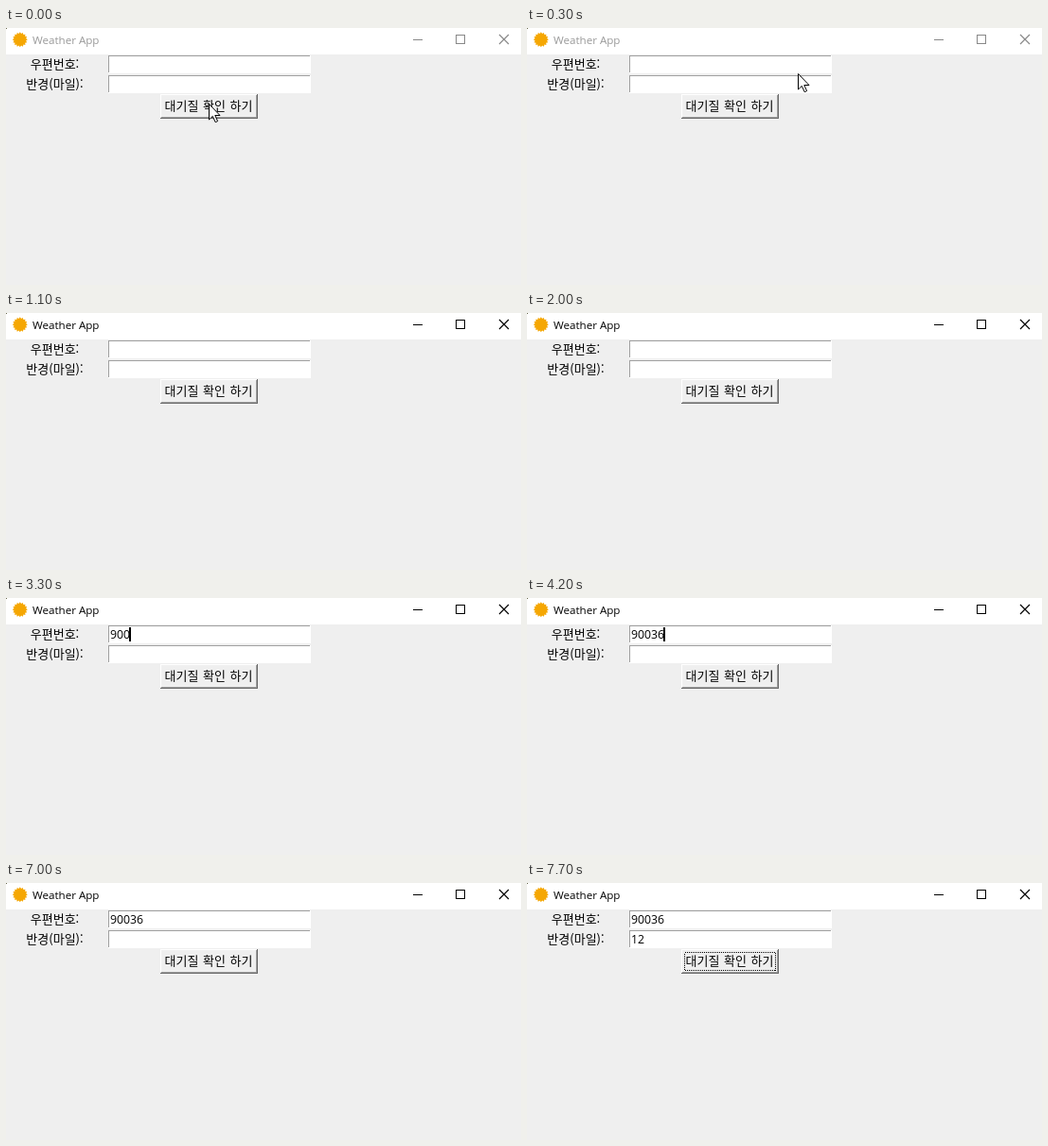
Write an HTML page that moves like this. It is 544 by 272 pixels and loops after 8000 ms.

```html
<!DOCTYPE html>
<html lang="ko">
<head>
<meta charset="utf-8">
<title>Weather App</title>
<style>
  html, body { margin: 0; width: 100%; height: 100%; overflow: hidden; background: #efefef; }
  svg { display: block; width: 544px; height: 272px; }
  text { font-family: "Open Sans", "Noto Sans", sans-serif; font-size: 12.25px; }
  .ko { font-family: "Noto Sans CJK KR", "Noto Sans CJK", "Noto Sans CJK JP", sans-serif; font-size: 13px; font-weight: 350; text-anchor: middle; }
  .title { font-size: 11.6px; }
  .crisp { shape-rendering: crispEdges; }
</style>
</head>
<body>
<svg viewBox="0 0 544 272">
  <rect width="544" height="272" fill="#efefef"/>
  <rect width="544" height="28" fill="#fff"/>
  <rect class="crisp" width="1" height="1" fill="#6b6b50"/>
  <polygon id="sun" fill="#f5a703"/>
  <text id="title" class="title" x="28" y="16.5">Weather App</text>
  <g id="controls" fill="none">
    <path class="crisp" d="M430 12.5h10M475.5 7.5h9v9h-9z"/>
    <path d="M521 7l10 10M531 7l-10 10" stroke-width="1.2"/>
  </g>

  <text class="ko" x="51.5" y="42.5">우편번호:</text>
  <text class="ko" x="51.5" y="63.5">반경(마일):</text>

  <g id="fields" class="crisp"></g>
  <text id="zip" x="110" y="43"></text>
  <text id="radius" x="110" y="64"></text>

  <g class="crisp">
    <rect x="163" y="70" width="103" height="26" fill="#696969"/>
    <rect x="163" y="70" width="102" height="25" fill="#fff"/>
    <rect x="164" y="71" width="101" height="24" fill="#a0a0a0"/>
    <rect x="164" y="71" width="100" height="23" fill="#efefef"/>
    <rect id="focus" x="166.5" y="73.5" width="96" height="19" fill="none" stroke="#000" stroke-dasharray="1 1"/>
  </g>
  <text class="ko" x="214" y="86.5" style="word-spacing:1px">대기질 확인 하기</text>

  <rect id="caret" class="crisp" width="2" height="15"/>
  <path id="pointer" d="M.5.5v16.5l3.8-3.6 2.9 6.3 2.4-1.1-2.8-6.1h5.2z" fill="#fff" stroke="#000"/>
</svg>
<script>
const LOOP = 8000;
const $ = id => document.getElementById(id);

// Each list holds [start time, value]; a value lasts until the next entry.
const zipText = [[0, ''], [2500, '9'], [2900, '90'], [3100, '900'], [3600, '9003'], [3700, '90036']];
const radiusText = [[0, ''], [7600, '12']];
const caretOn = [
  [0, false], [500, true], [1100, false], [1400, true], [2000, false], [2300, true],
  [2900, false], [3300, true], [3900, false], [4200, true], [5100, false], [5400, true],
  [6000, false], [6400, true], [7000, false], [7300, true], [7700, false]
];
const pointerAt = [
  [0, [214, 80]], [100, [232, 70]], [200, [270, 54]], [300, [286, 48]],
  [900, [390, 52]], [1000, [527, 62]], [1100, null]
];

const valueAt = (steps, t) => steps.reduce((v, [start, next]) => t >= start ? next : v, null);
const show = (el, on) => el.setAttribute('visibility', on ? 'visible' : 'hidden');

$('sun').setAttribute('points', Array.from({ length: 32 }, (_, i) => {
  const a = i * Math.PI / 16, r = i % 2 ? 6.4 : 8;
  return `${14.8 + r * Math.cos(a)},${12.3 + r * Math.sin(a)}`;
}).join(' '));

$('fields').innerHTML = [29, 50].map(y =>
  `<rect x="108" y="${y}" width="214" height="19" fill="#fff"/>
   <path d="M108.5 ${y + 18}v-17.5h212.5" fill="none" stroke="#a0a0a0"/>`).join('');

function render(t) {
  const zip = valueAt(zipText, t);
  const radius = valueAt(radiusText, t);
  const active = t >= 500;
  const inRadius = t >= 4500;

  $('title').setAttribute('fill', active ? '#000' : '#999');
  $('controls').setAttribute('stroke', active ? '#000' : '#888');
  $('zip').textContent = zip;
  $('radius').textContent = radius;

  $('caret').setAttribute('x', 109 + 7 * (inRadius ? radius : zip).length);
  $('caret').setAttribute('y', inRadius ? 52 : 31);
  show($('caret'), valueAt(caretOn, t));
  show($('focus'), t >= 7700);

  const pos = valueAt(pointerAt, t);
  show($('pointer'), pos);
  if (pos) $('pointer').setAttribute('transform', `translate(${pos})`);
}

const begin = performance.now();
function tick() {
  render((performance.now() - begin) % LOOP);
  requestAnimationFrame(tick);
}
render(0);
requestAnimationFrame(tick);
</script>
</body>
</html>
```
